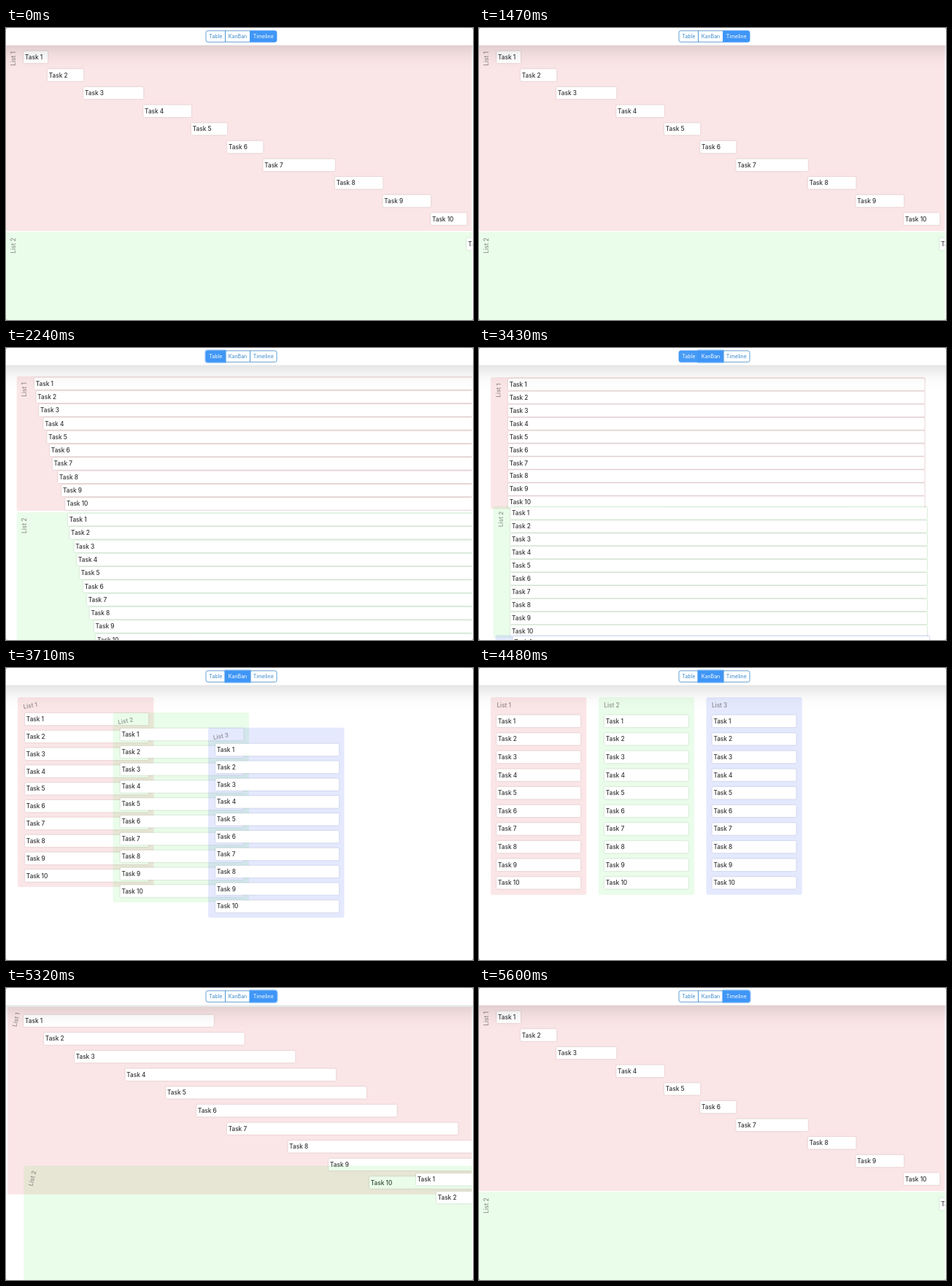
Write an HTML page that moves like this. It is 640 by 400 pixels and loops after 6160 ms.

```html
<!DOCTYPE html>
<html lang="en">
<head>
<meta charset="utf-8">
<title>Task views</title>
<style>
  html, body { margin: 0; width: 100%; height: 100%; overflow: hidden; background: #fff; }
  svg { display: block; width: 100vw; height: 100vh; }
  text { font-family: Inter, Roboto, sans-serif; }
  .task rect { fill: #fff; filter: drop-shadow(0 .7px .9px rgba(0, 0, 0, .17)); }
  .task text { font-size: 8.25px; font-weight: 500; fill: #333; }
  .head { font-size: 8.25px; font-weight: 500; fill: #333; fill-opacity: .52; text-anchor: middle; }
  .bar { fill: #fff; filter: drop-shadow(0 6.5px 13px rgba(0, 0, 0, .15)); }
  .btn text { font-size: 7px; text-anchor: middle; }
  .ring { fill: none; stroke: #3f96f6; stroke-width: 1.6; }
</style>
</head>
<body>
<svg id="stage" viewBox="0 0 640 400">
  <defs><clipPath id="page"><rect width="638.5" height="400"/></clipPath></defs>
  <g id="board" clip-path="url(#page)"></g>
  <rect class="bar" x="-30" y="-20" width="700" height="43.5"/>
  <g id="nav"></g>
  <path fill="#bbb" fill-rule="evenodd"
    d="M0 0H640V400H0ZM3 0A3 3 0 0 0 0 3V397A3 3 0 0 0 3 400H637A3 3 0 0 0 640 397V3A3 3 0 0 0 637 0Z"/>
</svg>
<script>
const LOOP = 6160;
const DAY = 16.41;
const ROW = 24.63;
const BLUE = [63, 150, 246];
const LINK = [58, 136, 200];
const TINTS = ['rgba(215,15,20,.1)', 'rgba(55,225,55,.1)', 'rgba(0,40,245,.1)'];
const DAYS = [
  [2, 3, 5, 4, 3, 3, 6, 4, 4, 3],
  [2, 5, 3, 3, 4, 4, 3, 5, 2, 4],
  [5, 6, 3, 4, 2, 3, 5, 4, 2, 3]
];

// Each view places a list j and, inside it, a task i; task width = pct * list width + w.
const timeline = {
  list: j => ({ x: -0.4, y: 23.5 + 256.1 * j, w: 1813, h: 254.4, hx: 10.5, hy: 18.4, turn: -90 }),
  task: (i, start, days) => ({ x: 24.6 + DAY * start, y: 8.2 + ROW * i, pct: 0, w: DAY * days })
};
const table = {
  list: j => ({ x: 16, y: 39.9 + 180.7 * j, w: 606.3, h: 178.6, hx: 10.3, hy: 18.2, turn: -90 }),
  task: i => ({ x: 24.2, y: 1.2 + 17.8 * i, pct: 1, w: -25 })
};
const kanban = {
  list: j => ({ x: 16 + 147.7 * j, y: 39.9, w: 131.3, h: 270.8, hx: 18.2, hy: 10.6, turn: 0 }),
  task: i => ({ x: 8.2, y: ROW + ROW * i, pct: 1, w: -16.4 })
};

const MOVES = [
  { at: 1908, time: 500, from: timeline, to: table },
  { at: 3412, time: 500, from: table, to: kanban },
  { at: 4990, time: 600, from: kanban, to: timeline }
];

const BUTTONS = [
  { name: 'Table', x: 274, w: 26.5, left: 2.5, right: 0, fill: [1470, 3412], ring: [1750, 3290] },
  { name: 'KanBan', x: 300.5, w: 34, left: 0, right: 0, fill: [2940, 4990], ring: [3290, 4850] },
  { name: 'Timeline', x: 334.5, w: 36.5, left: 0, right: 2.5, fill: [4620, 1908], ring: [4850, LOOP] }
];

const clamp = v => Math.min(1, Math.max(0, v));
const lerp = (a, b, p) => a + (b - a) * p;

function mix(a, b, p) {
  const out = {};
  for (const k in a) out[k] = lerp(a[k], b[k], p);
  return out;
}

function el(name, attrs, parent, label) {
  const node = document.createElementNS('http://www.w3.org/2000/svg', name);
  set(node, attrs);
  if (label) node.textContent = label;
  parent.appendChild(node);
  return node;
}

function set(node, attrs) {
  for (const k in attrs) node.setAttribute(k, attrs[k]);
}

// cubic-bezier(.25, .1, .25, 1)
function ease(t) {
  if (t <= 0 || t >= 1) return clamp(t);
  let lo = 0, hi = 1, u = t;
  for (let n = 0; n < 24; n++) {
    u = (lo + hi) / 2;
    if (.75 * u * (1 - u) + u ** 3 < t) lo = u; else hi = u;
  }
  return .3 * u * (1 - u) ** 2 + 3 * u * u * (1 - u) + u ** 3;
}

function fade(t, at) {
  const p = clamp((t - at) / 150);
  return p * p * (3 - 2 * p);
}

// A window that wraps past the loop end starts switched on.
function level(t, [on, off]) {
  const v = fade(t, on) - fade(t, off);
  return on > off ? v + 1 : v;
}

function pill(x, y, w, h, l, r) {
  return `M${x + l} ${y}H${x + w - r}a${r} ${r} 0 0 1 ${r} ${r}V${y + h - r}a${r} ${r} 0 0 1 ${-r} ${r}` +
    `H${x + l}a${l} ${l} 0 0 1 ${-l} ${-l}V${y + l}a${l} ${l} 0 0 1 ${l} ${-l}Z`;
}

const board = document.getElementById('board');
const nav = document.getElementById('nav');

let day = 0;
const lists = DAYS.map((spans, j) => {
  const g = el('g', {}, board);
  const back = el('rect', { rx: 2.6, fill: TINTS[j] }, g);
  const head = el('text', { class: 'head', y: 3 }, g, `List ${j + 1}`);
  const tasks = spans.map((days, i) => {
    const node = el('g', { class: 'task' }, g);
    const box = el('rect', { height: 16.4, rx: 1.6 }, node);
    el('text', { x: 1.8, y: 11.2 }, node, `Task ${i + 1}`);
    const start = day;
    day += days;
    return { node, box, start, days };
  });
  return { g, back, head, tasks };
});

for (const b of BUTTONS) {
  const g = el('g', { class: 'btn' }, nav);
  b.face = el('path', { d: pill(b.x, 3.8, b.w, 15.4, b.left, b.right), 'stroke-width': .8 }, g);
  b.label = el('text', { x: b.x + b.w / 2, y: 14.1 }, g, b.name);
}
for (const b of BUTTONS) {
  const d = pill(b.x - .8, 3, b.w + 1.6, 17, b.left + .8, b.right + .8);
  b.halo = el('path', { class: 'ring', d }, nav);
}

function blend(a, b, p) {
  return `rgb(${a.map((v, n) => Math.round(lerp(v, b[n], p)))})`;
}

function draw(t) {
  const move = MOVES.filter(m => t >= m.at).pop() || MOVES[0];
  const p = ease((t - move.at) / move.time);

  lists.forEach((list, j) => {
    const s = mix(move.from.list(j), move.to.list(j), p);
    set(list.g, { transform: `translate(${s.x} ${s.y})` });
    set(list.back, { width: s.w, height: s.h });
    set(list.head, { transform: `translate(${s.hx} ${s.hy}) rotate(${s.turn})` });
    list.tasks.forEach((task, i) => {
      const { start, days } = task;
      const k = mix(move.from.task(i, start, days), move.to.task(i, start, days), p);
      set(task.node, { transform: `translate(${k.x} ${k.y})` });
      set(task.box, { width: k.pct * s.w + k.w });
    });
  });

  for (const b of BUTTONS) {
    const on = level(t, b.fill);
    set(b.face, { fill: blend([255, 255, 255], BLUE, on), stroke: blend(LINK, BLUE, on) });
    set(b.label, { fill: blend(LINK, [255, 255, 255], on) });
    set(b.halo, { opacity: .55 * level(t, b.ring) });
  }
}

const begin = performance.now();
function tick() {
  draw((performance.now() - begin) % LOOP);
  requestAnimationFrame(tick);
}
tick();
</script>
</body>
</html>
```
